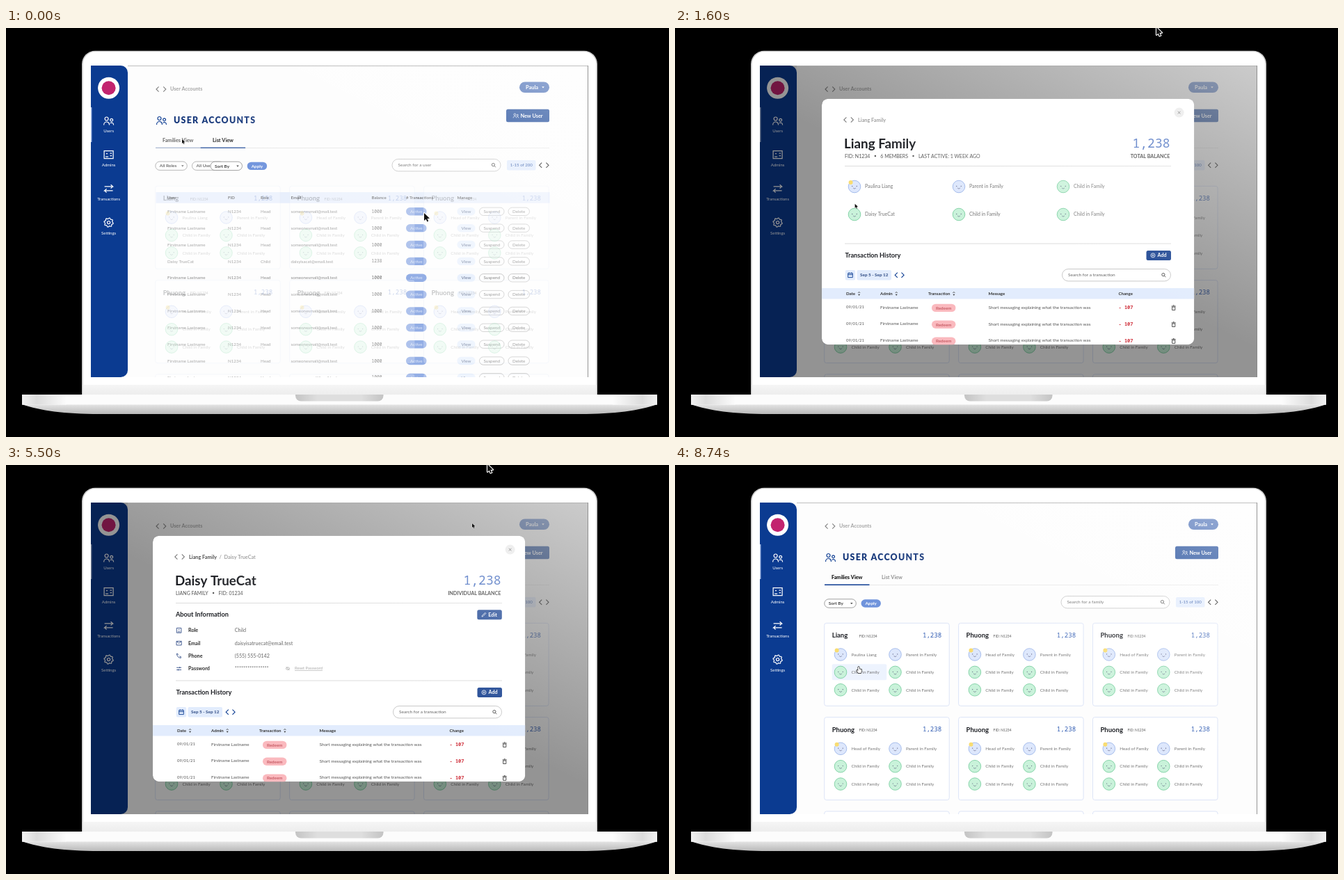
An HTML page with a canvas that plays this animation: 953 px wide and 588 px high, repeating every 8880 ms.

```html
<!DOCTYPE html>
<html lang="en">
<head>
<meta charset="utf-8">
<title>User accounts dashboard</title>
<style>
html, body { margin: 0; width: 100%; height: 100%; overflow: hidden; background: #000; }
canvas { display: block; width: 953px; height: 588px; }
</style>
</head>
<body>
<canvas id="stage"></canvas>
<script>
const W = 953, H = 588, LOOP = 8880;
const canvas = document.getElementById('stage');
const dpr = window.devicePixelRatio || 1;
canvas.width = W * dpr;
canvas.height = H * dpr;
const c = canvas.getContext('2d');

const SANS = 'Lato, "Open Sans", sans-serif';
const MONO = '"Noto Sans Mono", "DejaVu Sans Mono", monospace';
const NAVY = '#0b3b91', BLUE = '#6f93dc', PALE = '#e2ecfd', INK = '#1d1f24', GREY = '#777', SOFT = '#999';
const BOLD = { w: 700 }, CENTER = { align: 'center' };

const ICON = {
  people: 'M-.5-3a2.5 2.5 0 1 1-5 0a2.5 2.5 0 1 1 5 0M6-1.2a1.9 1.9 0 1 1-3.8 0a1.9 1.9 0 1 1 3.8 0M-7 6c0-6 8-6 8 0M2.2 3.4c2-1.6 4.8-.8 4.8 2.6',
  badge: 'M-6.5-5.5h13v11h-13zM-4.5 3h4M2-2h2.5M2 1.5h2.5M-3.6-1.5h2',
  swap: 'M-6-3H6l-3-2.6m3 2.6l-3 2.6M6 3H-6l3-2.6m-3 2.6l3 2.6',
  person: 'M-3.3-3.4h6.6v6.8h-6.6zM-1.8 2h3.6M-1-.9h2',
  mail: 'M-3.6-2.8h7.2v5.6h-7.2zl3.6 2.9l3.6-2.9',
  phone: 'M-1.2-1.2l-.6-2h-1.5q.6 5.6 6 6.2v-2l-2-.6',
  sliders: 'M-3.5-1.6h7M-3.5 1.6h7M1-2.6v2M-1 .6v2',
  eye: 'M-3 0q3-3.6 6 0q-3 3.6-6 0M-2.4-2.2l4.8 4.4',
  bin: 'M-3.1-2.4h6.2M-1-3.6h2M-2.1-1.4v4.6h4.2v-4.6z',
  calendar: 'M-3.3-2.6h6.6v6h-6.6zM-3.3-.6h6.6M-1.8-3.8v1.6M1.8-3.8v1.6',
  pencil: 'M-2.8 2.8l.6-1.8L2-2.8l1 1L-1.2 2.4z',
  plus: 'M3 0a3 3 0 1 1-6 0a3 3 0 1 1 6 0M-1.5 0h3M0-1.5v3',
  glass: 'M1.5-.6a2.1 2.1 0 1 1-4.2 0a2.1 2.1 0 1 1 4.2 0M.9 1l2 2',
  cross: 'M-1.8-1.8l3.6 3.6M1.8-1.8l-3.6 3.6',
  left: 'M1.8-3.6L-1.8 0l3.6 3.6',
  right: 'M-1.8-3.6L1.8 0l-3.6 3.6',
  up: 'M-1.5 0L0-1.6L1.5 0',
  down: 'M-1.8-1h3.6L0 1.3z',
  arrow: 'M0 0V11l2.6-2.3l1.8 3.9l1.8-.8L4.5 8L8 7.8z',
  hand: 'M-.8.6Q0-.6.8.6l.1 2.6l3.3.8l.1 2.5L3.3 9h-3.9L-3 5.6l.8-.8l1.4 1.2z'
};
for (const k in ICON) ICON[k] = new Path2D(ICON[k]);

// ---------- helpers ----------
const clamp = v => Math.max(0, Math.min(1, v));
const lerp = (a, b, p) => a + (b - a) * p;
const ease = u => u < .5 ? 2 * u * u : 1 - 2 * (1 - u) * (1 - u);
const span = (t, start, dur) => ease(clamp((t - start) / dur));
const pulse = (t, on, off, dur, out = dur) => span(t, on, dur) * (1 - span(t, off, out));

function style({ w = 400, align = 'left', font = SANS, ls = 0 }, size) {
  c.font = `${w} ${size}px ${font}`;
  c.letterSpacing = ls + 'px';
  c.textAlign = align;
  c.textBaseline = 'middle';
}

// Returns the right edge of left-aligned text
function txt(s, x, y, size, color, opt = {}) {
  style(opt, size);
  c.fillStyle = color;
  c.fillText(s, x, y + .3);
  return x + c.measureText(s).width;
}

function paint(fill, stroke, lw = .8) {
  if (fill) { c.fillStyle = fill; c.fill(); }
  if (stroke) { c.strokeStyle = stroke; c.lineWidth = lw; c.stroke(); }
}

function box(x, y, w, h, r, fill, stroke, lw) {
  c.beginPath();
  c.roundRect(x, y, w, h, r);
  paint(fill, stroke, lw);
}

function dot(x, y, r, fill, stroke, lw) {
  c.beginPath();
  c.arc(x, y, r, 0, 7);
  paint(fill, stroke, lw);
}

const rule = (x0, x1, y, color) => box(x0, y - .4, x1 - x0, .8, 0, color);

function at(x, y, k, draw) {
  c.save();
  c.translate(x, y);
  c.scale(k, k);
  draw();
  c.restore();
}

function icon(name, x, y, color, lw = .9, k = 1) {
  at(x, y, k, () => {
    c.strokeStyle = color;
    c.lineWidth = lw;
    c.stroke(ICON[name]);
  });
}

function glyph(name, x, y, fill, k = 1) {
  at(x, y, k, () => { c.fillStyle = fill; c.fill(ICON[name]); });
}

function fade(a, draw) {
  if (a <= 0) return;
  c.save();
  c.globalAlpha *= Math.min(1, a);
  draw();
  c.restore();
}

function arrows(x, gap, y, color) {
  icon('left', x, y, color, 1.1);
  icon('right', x + gap, y, color, 1.1);
}

// Pill as wide as its label; returns where the next one starts
function pill(label, x, y, fill, stroke, color, opt = {}) {
  const size = 6.3, pad = 6;
  style(opt, size);
  const w = c.measureText(label).width + 2 * pad;
  box(x, y - 5.7, w, 11.4, 5.7, fill, stroke, .7);
  txt(label, x + pad, y, size, color, opt);
  return x + w + 6;
}

function select(label, x, y) {
  box(x, y - 6.2, 45.5, 12.4, 6.2, '#fff', '#8a8a8a');
  txt(label, x + 6, y, 6.4, '#444', BOLD);
  glyph('down', x + 39, y, '#555');
}

function search(label, x, y) {
  box(x, y - 8.7, 156, 17.4, 8.7, '#fff', '#bbb');
  txt(label, x + 8.5, y, 6.5, '#666');
  icon('glass', x + 146, y, '#555', 1);
}

function button(label, x, y, color, name) {
  box(x, y - 7, 35.5, 14, 2.5, color);
  icon(name, x + 9.5, y, '#fff', .8);
  txt(label, x + 16, y, 7.2, '#fff', BOLD);
}

// ---------- page ----------
function gear(x, y) {
  c.beginPath();
  for (let i = 0; i <= 48; i++) {
    const a = i * Math.PI / 24, r = 5.9 + .8 * Math.sin(a * 8);
    c.lineTo(x + r * Math.cos(a), y + r * Math.sin(a));
  }
  paint(null, '#fff', 1.2);
  dot(x, y, 2.1, null, '#fff', 1.2);
}

function sidebar() {
  const x = 147.6;
  box(122, 54, 53, 448, [0, 10, 10, 0], NAVY);
  dot(x, 86.3, 15.5, '#fff');
  dot(x, 86.3, 10, '#c2246f');
  box(122, 114, 1.4, 50, 0, '#a9bfe8');
  ['Users', 'Admins', 'Transactions', 'Settings'].forEach((s, i) => {
    const y = 133.5 + i * 48.7, name = ['people', 'badge', 'swap'][i];
    name ? icon(name, x, y, '#fff', 1.2) : gear(x, y);
    txt(s, x, y + 14.8, 6, '#fff', CENTER);
  });
}

function tab(label, x, y, textX, on) {
  txt(label, textX, y, 7.3, '#8c8c8c', BOLD);
  fade(on, () => {
    txt(label, textX, y, 7.3, '#222', BOLD);
    box(x, y + 9.9, 64.5, 1.6, 0, NAVY);
  });
}

// p is the share of the families view: 0 list, 1 families
function header(p) {
  arrows(217.8, 10.2, 88, '#777');
  txt('User Accounts', 236, 88, 7.2, SOFT, BOLD);
  box(738, 77.5, 43, 15.6, 7.8, '#2f59ab');
  txt('Paula', 756, 85, 7.4, '#fff', { ...BOLD, ...CENTER });
  glyph('down', 772, 85.2, '#fff');
  box(719, 116.7, 62, 18.6, 2.5, NAVY);
  icon('people', 733, 126, '#fff', 1.3, .55);
  txt('New User', 739.5, 126, 7.3, '#fff', BOLD);
  icon('people', 223.5, 133, NAVY, 1.2);
  txt('USER ACCOUNTS', 241, 132.8, 12.4, '#0c2f75', { w: 900, ls: 1.25 });

  rule(215, 781, 172.5, '#e8e8e8');
  tab('Families View', 215, 161.5, 225, p);
  tab('List View', 279.6, 161.5, 297, 1 - p);

  const x = 214.8, pitch = 52.7, y = lerp(198.2, 199, p);
  fade(1 - p, () => ['All Roles', 'All Users'].forEach((s, i) => select(s, x + i * pitch, 198.2)));
  select('Sort By', x + pitch * lerp(2, 0, p), y);
  pill('Apply', x + pitch * lerp(3, 1, p), y, BLUE, null, '#fff', BOLD);

  const [noun, total] = p > .5 ? ['family', 100] : ['user', 200];
  search('Search for a ' + noun, 555, 197.2);
  box(720, 190, 41.5, 14.4, 2, PALE);
  txt('1-15 of ' + total, 740.8, 197.2, 6.1, '#2d55a5', CENTER);
  arrows(768.4, 9.8, 197.3, '#222');
}

function face(x, y, kind) {
  const [fill, line] = kind === 'child' ? ['#c9f2da', '#6fcb98'] : ['#dde7fc', '#94afe8'];
  dot(x, y, 8.8, fill, line);
  if (kind === 'head') dot(x - 5.4, y - 6, 3, '#f8dc72');
  for (const side of [-1, 1]) dot(x + side * 3.2, y - .6, .6, '#557');
  c.beginPath();
  c.arc(x, y + 1, 2, .4, 2.74);
  paint(null, '#557', .6);
}

const kindOf = i => ['head', 'parent'][i] || 'child';
const MEMBER = { head: 'Head of Family', parent: 'Parent in Family', child: 'Child in Family' };

function card(x, y, first, hover) {
  box(x, y, 179.5, 119, 3, '#fff', '#d9e1f7', .9);
  txt(first ? 'Liang' : 'Phuong', x + 11, y + 18, 9.5, INK, BOLD);
  txt('FID: N1234', x + 50, y + 19, 5, '#555');
  txt('1,238', x + 168.5, y + 18, 9.1, '#2f5bb2', { align: 'right', font: MONO });
  if (hover) box(x + 11, y + 59, 78.5, 23, 2, '#edf3fe');
  for (let i = 0; i < 6; i++) {
    const fx = x + 23.3 + i % 2 * 78.5, fy = y + 45.2 + (i >> 1) * 25.4, kind = kindOf(i);
    face(fx, fy, kind);
    txt(first && !i ? 'Paulina Liang' : MEMBER[kind], fx + 15.4, fy, 6.35, GREY);
  }
}

function families(hover) {
  for (let i = 0; i < 9; i++)
    card(214.7 + i % 3 * 192.9, 227.3 + Math.floor(i / 3) * 135.3, !i, hover && !i);
}

const COLS = { User: 232, FID: 319, Role: 366, Email: 409.5, Balance: 525.5, '# Transactions': 575, Manage: 648.5 };

function list() {
  box(215.5, 236, 566, 15.8, 0, PALE);
  for (const s in COLS) txt(s, COLS[s], 243.8, 6.1, '#333', BOLD);
  for (let i = 0; i < 11; i++) {
    const y = 263.8 + i * 23.86;
    const [User, Role, Email, balance] = i === 3
      ? ['Daisy TrueCat', 'Child', 'daisyisacat@email.test', '1238']
      : ['Firstname Lastname', 'Head', 'someonesmail@mail.test', '1000'];
    const row = { User, FID: 'N1234', Role, Email };
    for (const s in row) txt(row[s], COLS[s], y, 6.2, '#666');
    txt(balance, COLS.Balance, y, 6.2, '#444', { font: MONO });
    pill('Active', COLS['# Transactions'], y, BLUE, null, '#fff');
    let x = pill('View', COLS.Manage, y, PALE, null, '#3b4a70');
    for (const s of ['Suspend', 'Delete']) x = pill(s, x, y, '#fff', '#999', '#555');
  }
}

// ---------- dialog ----------
const LEFT = 244, RIGHT = 713;

function intro(name, facts, total) {
  txt(name, LEFT - 1, 166.6, 18.8, INK, BOLD);
  let x = LEFT;
  facts.forEach((s, i) => {
    if (i) dot(x - 7.5, 184, 1.2, '#555');
    x = txt(s, x, 184.2, 7, '#555') + 15;
  });
  txt('1,238', RIGHT - 1.5, 166.4, 18, '#3a64bb', { align: 'right', font: MONO });
  txt(total, RIGHT - 1.5, 184.2, 7.2, '#333', { ...BOLD, align: 'right' });
  rule(LEFT, RIGHT, 198.5, '#dcdcdc');
}

function familyPane() {
  txt('Liang Family', 263, 132, 7.3, SOFT, BOLD);
  intro('Liang Family', ['FID: N1234', '6 MEMBERS', 'LAST ACTIVE: 1 WEEK AGO'], 'TOTAL BALANCE');
  for (let i = 0; i < 6; i++) {
    const x = 258 + i % 3 * 150, y = 228 + (i > 2) * 40;
    face(x, y, kindOf(i));
    txt({ 0: 'Paulina Liang', 3: 'Daisy TrueCat' }[i] || MEMBER[kindOf(i)], x + 15, y, 7, GREY);
  }
}

const ABOUT = [
  ['person', 'Role', 'Child'],
  ['mail', 'Email', 'daisyisatruecat@email.test'],
  ['phone', 'Phone', '(555) 555-0142'],
  ['sliders', 'Password', '*'.repeat(16)]
];

function personPane(edit, inputs) {
  const x = txt('Liang Family', 263, 132, 7.3, '#444', BOLD);
  txt('/  Daisy TrueCat', x + 3.5, 132, 7.3, SOFT, BOLD);
  intro('Daisy TrueCat', ['LIANG FAMILY', 'FID: 01234'], 'INDIVIDUAL BALANCE');
  txt('About Information', LEFT, 215.2, 9.2, INK, BOLD);

  // Edit splits into Cancel and Save
  const bx = 677.3, by = 215.2, slide = lerp(bx, 640, edit), mid = { ...BOLD, ...CENTER };
  fade(edit * 3, () => box(slide, by - 6.6, 34.5, 13.2, 2.5, '#fff', '#8496bd', .9));
  fade(edit, () => txt('Cancel', slide + 17.2, by, 6.6, '#345', mid));
  fade(edit * (1 - .4 * Math.sin(Math.PI * edit)), () => {
    box(bx, by - 7, 35.5, 14, 2.5, '#1f4793');
    txt('Save', bx + 17.7, by, 7, '#fff', mid);
  });
  fade(1 - edit, () => button('Edit', bx, by, '#1f4793', 'pencil'));

  ABOUT.forEach(([name, key, value], i) => {
    const y = 237.8 + i * 18.35;
    fade(inputs, () => box(321, y - 7.3, 385, 14.6, 2, '#fff', '#c3cfe8'));
    icon(name, 248.6, y, '#355089');
    txt(key, 262, y, 7.2, '#2a2a2a', BOLD);
    txt(value, 328.8, y, 7.2, '#666');
    if (i < 3) fade(edit, () => icon('pencil', 703, y, '#aaa', .7));
  });
  icon('eye', 405, 292.6, SOFT, .7);
  rule(415, txt('Reset Password', 415, 292.3, 5.8, '#aaa'), 295.4, '#bbb');
}

const LOG = { Date: 246, Admin: 295, Transaction: 364, Message: 450.5, Change: 637.5 };

function history() {
  rule(LEFT, RIGHT, 310, '#dcdcdc');
  txt('Transaction History', LEFT + .5, 327.2, 9.2, INK, BOLD);
  button('Add', 677.5, 326.9, '#1f4793', 'plus');
  const y = 355.2;
  box(244.8, y - 7.2, 14.4, 14.4, 2, PALE);
  icon('calendar', 252, y, NAVY);
  box(261.5, y - 7.2, 49.5, 14.4, 2, PALE);
  txt('Sep 5 - Sep 12', 286.2, y, 6.3, '#2a4780', { ...BOLD, ...CENTER });
  arrows(318, 9.3, y, NAVY);
  search('Search for a transaction', 556.5, y);

  box(211, 374, 535.5, 15.6, 0, PALE);
  Object.keys(LOG).forEach((s, i) => {
    const end = txt(s, LOG[s], 382, 6.1, '#333', BOLD) + 5.5;
    if (i > 2) return;
    icon('up', end, 381, '#333', .8);
    glyph('down', end, 383.6, '#333', .85);
  });
  for (let i = 0; i < 3; i++) {
    const ry = 401.4 + i * 23.9;
    txt('09/01/21', LOG.Date, ry, 5.9, '#555');
    txt('Firstname Lastname', LOG.Admin, ry, 6.2, '#555');
    pill('Redeem', LOG.Transaction + 5, ry + 1, '#fab9be', null, '#b8434d');
    txt('Short messaging explaining what the transaction was', LOG.Message, ry, 6.35, '#555');
    txt('- 107', LOG.Change, ry, 7, '#d0343f', { w: 600, font: MONO });
    icon('bin', 716.7, ry + 1, '#444');
  }
}

function dialog(t, open) {
  const swap = span(t, 1860, 260);
  const edit = pulse(t, 2580, 4850, 300, 50);
  const inputs = pulse(t, 3940, 4850, 160, 50);
  c.save();
  c.translate(0, lerp(403, 0, open));
  c.globalAlpha = clamp(.93 + open * .1);
  c.beginPath();
  c.roundRect(211, 101.7, 535.3, 353.5, 9);
  c.clip();
  c.fillStyle = '#fff';
  c.fill();
  dot(724.6, 121.6, 7, '#e6e6e6');
  icon('cross', 724.6, 121.6, '#555');
  arrows(244.6, 10, 132, GREY);
  fade(1 - swap, familyPane);
  fade(swap, () => personPane(edit, inputs));
  history();
  c.restore();
}

// ---------- laptop ----------
// Evenly spaced colour stops
function ramp(x0, y0, x1, y1, ...colors) {
  const g = c.createLinearGradient(x0, y0, x1, y1);
  colors.forEach((color, i) => g.addColorStop(i / (colors.length - 1), color));
  return g;
}

function laptop() {
  box(109, 32.7, 741, 496, [19, 19, 0, 0], '#c9c9c9');
  box(110.6, 34, 737.8, 494, [18, 18, 0, 0], '#fff');
  box(110.6, 513, 737.8, 14, 0, ramp(0, 512, 0, 527, '#f6f6f6', '#ededed'));

  c.fillStyle = ramp(0, 540, 0, 555, '#e8e8e8', '#b9b9b9');
  c.fill(new Path2D('M23 527H936V541C910 550 875 555 825 555H134C84 555 49 550 23 541Z'));
  box(23, 527, 913, 14.5, 0, '#fcfcfc');
  for (const [x, dir] of [[23, 1], [936, -1]]) {
    c.fillStyle = ramp(x, 0, x + 64 * dir, 0, '#f2f2f2', '#dcdcdc', '#ececec', '#fcfcfc');
    c.fillRect(Math.min(x, x + 64 * dir), 527, 64, 14.5);
  }
  box(416, 527, 126.5, 9.6, [0, 0, 8, 8], ramp(416, 0, 542, 0, '#c4c4c4', '#dedede', '#dedede', '#dedede', '#c4c4c4'));
}

// ---------- pointers ----------
function cursor(name, x, y, k, fill, edge, lw) {
  at(x, y, k, () => {
    c.lineJoin = 'round';
    c.strokeStyle = edge;
    c.lineWidth = lw;
    c.stroke(ICON[name]);
    c.fillStyle = fill;
    c.fill(ICON[name]);
  });
}

// Places the pointer visits, with arrival time and travel time
const STOPS = [
  { at: 0, x: 253, y: 160 },
  { at: 850, x: 240, y: 245, dur: 600 },
  { at: 1800, x: 290, y: 266, hand: true },
  { at: 2600, x: 687, y: 213, hand: true },
  { at: 3150, x: 503, y: 268 },
  { at: 3850, x: 486, y: 234, dur: 700 },
  { at: 4550, x: 681, y: 214, hand: true },
  { at: 5450, x: 670, y: 84 },
  { at: 5930, x: 278, y: 181 },
  { at: 6500, x: 315, y: 166 },
  { at: 7700, x: 254, y: 156, dur: 650, hand: true },
  { at: 8740, x: 264, y: 290, dur: 740, hand: true }
];

function pointer(t) {
  let { x, y } = STOPS[0], hand = false;
  for (const s of STOPS) {
    const p = span(t, s.at - (s.dur || 350), s.dur || 350);
    x = lerp(x, s.x, p);
    y = lerp(y, s.y, p);
    if (p > .2) hand = p > .75 && s.hand;
  }
  hand ? cursor('hand', x, y, 1, '#fff', '#222', 1.4) : cursor('arrow', x, y, .55, '#111', '#fff', 1.2);
}

function bigPointer(t) {
  if (t >= 5650) return;
  const p = span(t, 20, 780);
  cursor('arrow', lerp(601, 692, p), lerp(266, -1, p), 1, '#111', '#fff', 2.2);
}

// ---------- scene ----------
function render(t) {
  c.setTransform(dpr, 0, 0, dpr, 0, 0);
  c.fillStyle = '#000';
  c.fillRect(0, 0, W, H);
  laptop();

  const listed = Math.max(1 - span(t, -140, 400), pulse(t, 6640, 7860, 400));
  const open = pulse(t, 960, 5520, 400);
  c.save();
  c.beginPath();
  c.rect(122, 54, 715, 448);
  c.clip();
  box(122, 54, 715, 448, 0, '#fdfdfd');
  header(1 - listed);
  fade(listed, list);
  fade(1 - listed, () => families(t >= 8380));
  sidebar();
  if (open > 0) {
    box(122, 54, 715, 448, 0, `rgba(0,0,0,${.42 * open})`);
    dialog(t, open);
  }
  // Glare from the upper right corner
  box(175, 54, 662, 448, 0, ramp(673, 381, 837, 54, 'rgba(255,255,255,0)', 'rgba(255,255,255,.52)'));
  c.restore();

  rule(175, 836.5, 54.3, '#aaa');
  box(836, 54, .9, 448, 0, '#888');
  pointer(t);
  bigPointer(t);
}

const start = performance.now();
function tick() {
  render((performance.now() - start) % LOOP);
  requestAnimationFrame(tick);
}
tick();
</script>
</body>
</html>
```
